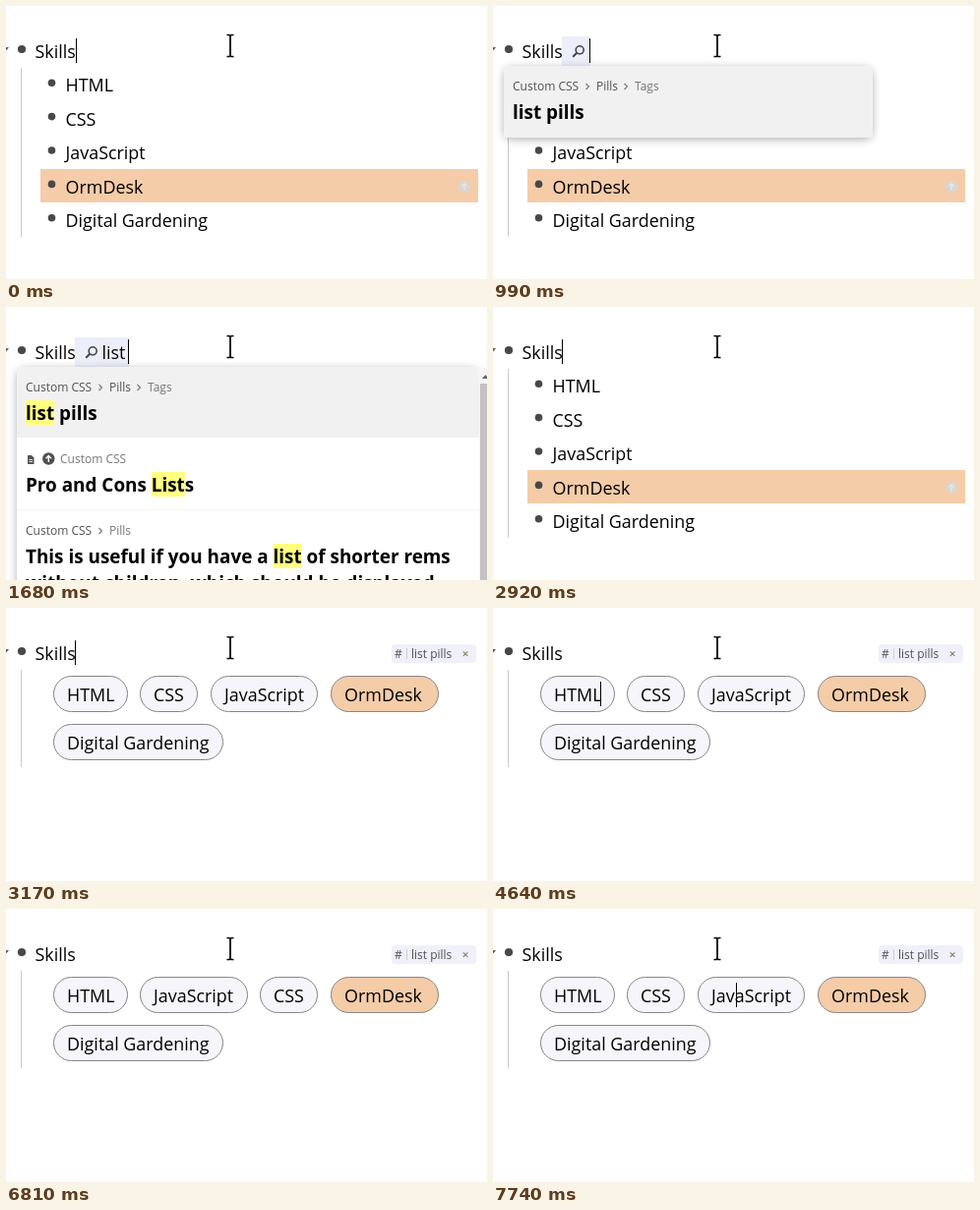
Recreate the animation shown at these times as an HTML page. Size 489 by 278 pixels, loop 8 s.

```html
<!DOCTYPE html>
<html lang="en">
<head>
<meta charset="utf-8">
<title>List pills</title>
<style>
html, body { margin: 0; width: 100%; height: 100%; overflow: hidden; background: #fff; }
svg { display: block; width: 489px; height: 278px; }
text { font: 17.9px "Open Sans", "Noto Sans", sans-serif; fill: #000; white-space: pre; }
.title { font-size: 18.9px; font-weight: 700; }
.small { font-size: 12px; fill: #505050; }
.dim { fill: #777; }
</style>
</head>
<body>
<svg id="stage" viewBox="0 0 489 278">
  <defs>
    <filter id="shadow" x="-10%" y="-10%" width="120%" height="130%">
      <feDropShadow dx="0" dy="2" stdDeviation="4.5" flood-color="#000" flood-opacity=".3"/>
    </filter>
  </defs>
  <path d="M-5 42H3L-1 46.5Z" fill="#555"/>
  <circle cx="16" cy="44" r="4.1" fill="#484848"/>
  <g id="scene"></g>
  <path d="M224.500 29.500h2.500l1 1 1-1h2.500M228 30v21M224.500 51.500h2.500l1-1 1 1h2.500" fill="none" stroke="#000" stroke-width="1.7"/>
</svg>
<script>
const LOOP = 8000;
const ITEMS = ["HTML", "CSS", "JavaScript", "OrmDesk", "Digital Gardening"];
const PEACH = "#f5cca8";
const scene = document.getElementById("scene");

// [start, view, query or order, caret x, caret y]
const STEPS = [
  [0, "list", "", 71, 33],
  [460, "list", ""],
  [760, "list", "#", 82, 33],
  [990, "recent", "", 98, 33],
  [1220, "short", "l", 105, 33],
  [1450, "wide", "li", 109, 33],
  [1530, "wide", "lis", 117, 33],
  [1610, "wide", "list", 124, 33],
  [2230, "wide", "list"],
  [2690, "wide", "list", 124, 33],
  [2920, "list", "", 70, 33],
  [3090, "pills", "", 70, 33],
  [3460, "pills", ""],
  [4010, "pills", "", 70, 33],
  [4470, "pills", ""],
  [4640, "pills", "", 109, 75],
  [5250, "pills", ""],
  [5320, "pills", "", 181, 75],
  [5720, "pills", "", 247, 75],
  [6330, "pills", ""],
  [6810, "pills", "swap"],
  [6880, "pills", "swap", 175, 75],
  [7280, "pills", "swap"],
  [7740, "pills", "", 247, 75]
];

const rect = (x, y, w, h, fill, more = "") =>
  `<rect x="${x}" y="${y}" width="${w}" height="${h}" fill="${fill}" ${more}/>`;
const text = (x, y, s, cls = "", more = "") =>
  `<text x="${x}" y="${y}" class="${cls}" ${more}>${s}</text>`;
const title = (y, s, mark = "") => text(20, y, s, "title", `data-mark="${mark}"`);
const chevron = (x, y) =>
  `<path d="M${x - 1.5} ${y - 3}l3 3-3 3" fill="none" stroke="#777" stroke-width="1.1"/>`;
const arrowDot = (x, y, r, fill, line) =>
  `<circle cx="${x}" cy="${y}" r="${r}" fill="${fill}"/>` +
  `<path d="M${x} ${y + 3.5}v-6.5m-2.8 2.8l2.8-2.8 2.8 2.8" fill="none" stroke="${line}" stroke-width="1.4"/>`;
const guide = end => rect(15, 63, 1, end - 63, "#c9c9c9");

function crumbs(y, last) {
  const tail = last ? chevron(135, y - 4) + text(144, y, last, "small dim") : "";
  return text(20, y, "Custom CSS", "small") + chevron(96, y - 4) +
    text(105, y, "Pills", last ? "small" : "small dim") + tail;
}

function list() {
  let out = guide(235) + rect(35, 166, 445, 34, PEACH) +
    arrowDot(466, 184, 6.2, "#d8d5d2", "#efe6de");
  ITEMS.forEach((s, i) => {
    const y = 34.4 * i;
    out += `<circle cx="46.5" cy="${78.2 + y}" r="3.8" fill="#484848"/>` +
      text(60.5, Math.round(87.4 + y), s);
  });
  return out;
}

function pill(x, y, w, s, fill = "#f5f5fb") {
  return rect(x + .5, y + .5, w - 1, 36, fill, 'rx="18" stroke="#858585"') +
    text(x + 14, y + 26, s);
}

function pills(swap) {
  const [html, css, js, app, garden] = ITEMS;
  return guide(162) +
    rect(392, 37, 86, 19, "#eff0fa", 'rx="4"') +
    text(395, 51, "#", "small") + rect(407, 41, 1, 11, "#d0cfc8") +
    text(412, 51, "list pills", "small") +
    `<path d="M464.8 44.3l4.6 4.6m0-4.6l-4.6 4.6" stroke="#857c62" stroke-width="1.1"/>` +
    pill(48, 69, 76, html) +
    (swap ? pill(136, 69, 110, js) + pill(258, 69, 59, css)
          : pill(136, 69, 59, css) + pill(208, 69, 109, js)) +
    pill(330, 69, 110, app, PEACH) +
    pill(48, 118, 173, garden);
}

function panel(w, h, rowHeight) {
  return rect(11, 61, w, h, "#fff", 'rx="8" filter="url(#shadow)"') +
    `<path d="M11 ${61 + rowHeight}V69a8 8 0 0 1 8-8h${w - 16}a8 8 0 0 1 8 8v${rowHeight - 8}z" fill="#f1f1f1"/>`;
}

function search(query, caret) {
  return rect(70, 31, caret - 69, 30, "#eceef9") +
    `<g fill="none" stroke="#444" stroke-width="1.6"><circle cx="88.2" cy="44.8" r="4"/><path d="M85.2 47.8l-4 4" stroke-width="2"/></g>` +
    text(97.5, 53, query);
}

function recent() {
  return panel(375, 73, 73) + crumbs(86, "Tags") + title(115, "list pills");
}

function short() {
  return panel(375, 198, 52) + title(95, "layout pills", "l") +
    crumbs(139, "Tags") + title(168, "list pills", "l") +
    rect(11, 186, 375, 1, "#f0f0f0") +
    crumbs(212, "Skills") + title(241, "LaTeX", "l");
}

function wide(query) {
  return panel(470, 240, 72) +
    rect(481, 62, 8, 216, "#f6f6f6") + rect(482, 78, 7, 200, "#c2c2c2") +
    `<path d="M484 73l3.5-4 3.5 4z" fill="#666"/>` +
    crumbs(86, "Tags") + title(115, "list pills", query) +
    `<path d="M22 151h4l2.5 2.5v6.5h-6.5z" fill="#555"/><path d="M23.5 155.5h3.5m-3.5 2h3.5" stroke="#fff" stroke-width=".8"/>` +
    arrowDot(43.3, 154.5, 6.2, "#505050", "#fff") +
    text(55, 159, "Custom CSS", "small dim") + title(188, "Pro and Cons Lists", query) +
    rect(11, 206, 470, 1, "#f4f4f4") + crumbs(232) +
    title(261, "This is useful if you have a list of shorter rems", query) +
    title(288, "without children, which should be displayed");
}

// Yellow boxes behind the matched part of each result
function highlight() {
  for (const el of scene.querySelectorAll("[data-mark]")) {
    const mark = el.dataset.mark, s = el.textContent.toLowerCase();
    const at = mark ? s.indexOf(mark) : -1;
    if (at < 0) continue;
    const x = el.getStartPositionOfChar(at).x;
    const end = el.getEndPositionOfChar(at + mark.length - 1).x;
    el.insertAdjacentHTML("beforebegin", rect(x, el.getAttribute("y") - 20, end - x, 25, "#ffff80"));
  }
}

function draw([, view, arg, x, y]) {
  let out = text(29.5, 53, "Skills");
  out += view === "pills" ? pills(arg === "swap") : list();
  if (view === "list") out += text(71, 53, arg);
  if (view === "recent") out += search("", x) + recent();
  if (view === "short") out += search(arg, x) + short();
  if (view === "wide") out += search(arg, x || 124) + wide(arg);
  if (x) out += rect(x, y, 1, 25, "#000");
  scene.innerHTML = out;
  highlight();
}

let shown = null;
function tick() {
  const t = performance.now() % LOOP;
  const step = STEPS.findLast(s => s[0] <= t);
  if (step !== shown) draw(shown = step);
  requestAnimationFrame(tick);
}
tick();
</script>
</body>
</html>
```
